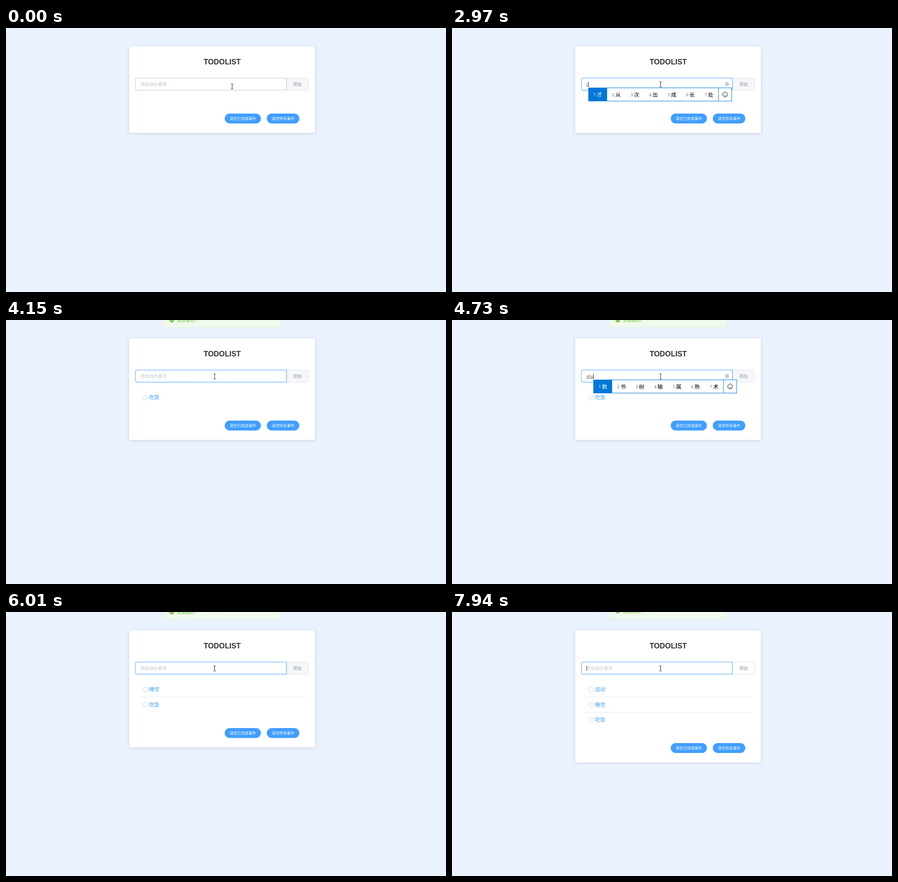
An HTML page that plays this animation: 965 by 580 pixels, repeating every 8 s.

```html
<!DOCTYPE html>
<html lang="zh-CN">
<head>
<meta charset="utf-8">
<title>TODOLIST</title>
<style>
html, body { margin: 0; width: 100%; height: 100%; overflow: hidden; background: #eaf2ff; }
svg { display: block; font: 9.6px 'Liberation Sans', 'Noto Sans CJK SC', sans-serif; }
text { white-space: pre; }
.blue { fill: #409eff; }
.mid { text-anchor: middle; }
.btn { font-size: 8.25px; fill: #fff; }
.item { font-size: 11.2px; }
.ime { font-size: 11.8px; }
.num { font: 9px 'Open Sans', sans-serif; fill: #666; }
.chosen text { fill: #fff; }
.crisp { shape-rendering: crispEdges; }
#card { filter: drop-shadow(0 1px 3px rgba(0, 0, 0, .13)); }
</style>
</head>
<body>
<svg width="965" height="580" viewBox="0 0 965 580">
  <defs>
    <g id="note">
      <rect x="344.5" y="-17.5" width="258" height="33" rx="2.5" fill="#f0f9eb" stroke="#e1f3d8"/>
      <circle cx="363.5" cy="0.7" r="4.8" fill="#67c23a"/>
      <path d="M361.2 .7l1.7 1.8 3-3.4" fill="none" stroke="#fff"/>
      <text x="374.6" y="4.4" fill="#67c23a">添加成功!</text>
    </g>
  </defs>
  <use id="oldNote" href="#note"/>
  <use id="newNote" href="#note"/>
  <rect id="card" x="270" y="40" width="407.5" rx="2.5" fill="#fff" stroke="#ebeef5" stroke-width=".7"/>
  <text x="474.2" y="80.3" class="mid" font-size="16.2" font-weight="bold" fill="#303133">TODOLIST</text>

  <path id="append" d="M615.5 110h45a3 3 0 0 1 3 3v20.500a3 3 0 0 1-3 3h-45z" stroke="#dcdfe6"/>
  <text x="639" y="127" class="mid" fill="#909399">添加</text>
  <path id="field" d="M287 110h328v26.500h-328a3 3 0 0 1-3-3v-20.500a3 3 0 0 1 3-3z" fill="#fff"/>
  <text id="hint" x="294.600" y="127" fill="#c0c4cc">添加待办事项</text>
  <text id="typed" x="294.600" y="127" fill="#606266"></text>
  <rect id="line" class="crisp" x="295" y="128" height="1" fill="#606266"/>
  <rect id="caret" class="crisp" y="118" width="1" height="11" fill="#303133"/>
  <g id="clear">
    <circle cx="603.2" cy="123.2" r="4.400" fill="#c0c4cc"/>
    <path d="M601.700 121.700l3 3m0-3l-3 3" stroke="#fff" stroke-width=".8"/>
  </g>

  <g id="list"></g>
  <g id="buttons">
    <rect x="479.700" y="188" width="79.300" height="21.700" rx="10.850" class="blue"/>
    <rect x="572" y="188" width="71.300" height="21.700" rx="10.850" class="blue"/>
    <text x="519.300" y="202" class="mid btn">清空已完成事件</text>
    <text x="607.700" y="202" class="mid btn">清空所有事件</text>
  </g>
  <g id="popup"></g>
  <path id="pointer" d="M-2.500-5.500h2l.5.500.5-.500h2M0-5V5M-2.500 5.500h2l.5-.500.5.500h2" fill="none" stroke="#222"/>
</svg>
<script>
const LOOP = 8000;
const $ = id => document.getElementById(id);
const show = (id, on) => $(id).style.display = on ? '' : 'none';

// time, typed text, caret visible, popup left edge, popup candidates
const input = [
  [0, '', 0], [790, '', 1], [1220, '', 0], [1770, '', 1], [2320, '', 0],
  [2820, 'c', 1], [2970, 'c', 1, 299, '才 从 次 出 成 长 处'],
  [3090, 'chi', 1, 311, '吃 持 池 尺 迟 齿 翅'],
  [3210, "chi'fan", 1, 325, '吃饭 迟返 吃翻 持范 池饭 尺帆 赤反'],
  [3330, '吃饭', 1], [3610, '', 1], [4150, '', 0],
  [4460, 's', 1], [4600, 's', 1, 299, '是 上 说 时 所 三 四'],
  [4730, 'shu', 1, 310, '数 书 树 输 属 熟 术'],
  [4880, 'shui', 1, 317, '睡 水 谁 税 睡觉 睡衣 水果'],
  [5030, "shui'jiao", 1, 336, '睡觉 睡觉觉 睡觉了 水饺 水角 税交 水窖'],
  [5150, '睡觉', 1], [5550, '', 1], [6010, '', 0], [6560, '', 1],
  [6870, 'y', 1], [6990, 'yu', 1, 299, '与 于 雨 语 鱼 玉 遇'],
  [7120, "yun'd", 1, 315, '运动 匀淡 晕倒 运单 云端 运到 云朵'],
  [7270, "yun'do", 1, 325, '运动 云朵 云洞 晕动 孕栋 匀动'],
  [7400, "yun'dong", 1, 337, '运动 云洞 晕动 云动 孕栋 匀动'],
  [7540, '运动', 1], [7820, '', 1]
];
const pointer = [[0, 496, 128.5], [150, 488, 127], [270, 472, 124], [390, 456, 122],
  [510, 448, 122], [1650, 453, 123], [1770, 457.5, 124]];
const border = [[0, '#c0c4cc'], [790, '#93b6df'], [940, '#409eff']];
const added = [[3610, '吃饭'], [5550, '睡觉'], [7820, '运动']];
// time, offset and opacity of the newest notice
const notice = [[0, 0, 0], [3760, -2.5, .8], [3880, 0, .95], [4030, 0, 1], [5550, 0, 0],
  [5700, -2.5, .9], [5850, 0, .95], [6010, 0, 1], [7820, 0, 0], [7940, -2.5, .9]];

const at = (steps, t) => steps.findLast(s => s[0] <= t);

function popupMarkup(left, words) {
  let x = left;
  const items = words.split(' ').map((word, i) => {
    const width = 28.8 + 11.8 * word.length;
    const back = i ? '' : `<rect x="${left}" y="131" width="${width + .6}" height="29" fill="#0078d7"/>`;
    const item = `<g class="${i ? '' : 'chosen'}">${back}
      <text class="num" x="${x + 11.5}" y="150.3">${i + 1}</text>
      <text class="ime" x="${x + 18.8}" y="151">${word}</text></g>`;
    x += width;
    return item;
  }).join('');
  const end = Math.round(x + 1), face = end + 15;
  return `<rect x="${left + .5}" y="131.5" width="${end + 29 - left}" height="29" fill="#fff" stroke="#0078d7"/>
    ${items}
    <path d="M${end + .5} 131v29" stroke="#0078d7"/>
    <g fill="none" stroke="#222"><circle cx="${face}" cy="146" r="5.5"/>
    <path d="M${face - 3} 147.500q3 3.500 6 0M${face - 2} 143.500v1.500m4-1.500v1.500"/></g>`;
}

function listMarkup(words) {
  return words.map((word, i) => {
    const y = 170.4 + 33.3 * i;
    const rule = i ? `<rect class="crisp" x="291" y="${Math.round(y - 17.4)}" width="365" height="1" fill="#e8ebf2"/>` : '';
    return `${rule}<circle cx="305.2" cy="${y + .3}" r="5.100" fill="#fff" stroke="#a6d1ff" stroke-width=".9"/>
      <text class="item blue" x="313.800" y="${y + 4}">${word}</text>`;
  }).join('');
}

let last, count;
function draw(t) {
  const state = at(input, t);
  const [, text, caret, left, words] = state;
  if (state !== last) {
    last = state;
    $('typed').textContent = text;
    const width = text ? $('typed').getComputedTextLength() : 0;
    $('caret').setAttribute('x', Math.round(294.6 + width));
    $('line').setAttribute('width', width);
    $('popup').innerHTML = words ? popupMarkup(left, words) : '';
    show('hint', !text);
    show('line', /[a-z]/.test(text));
    show('caret', caret);
    show('clear', text && t >= 2970);
  }

  const words2do = added.filter(a => a[0] <= t).map(a => a[1]).reverse();
  if (words2do.length !== count) {
    count = words2do.length;
    const shift = Math.round(33 * count + count / 4);
    $('list').innerHTML = listMarkup(words2do);
    $('card').setAttribute('height', 190.5 + shift);
    $('buttons').setAttribute('transform', `translate(0 ${shift})`);
  }

  const [, x, y] = at(pointer, t);
  $('pointer').setAttribute('transform', `translate(${x} ${y})`);
  $('field').setAttribute('stroke', at(border, t)[1]);
  $('append').setAttribute('fill', t < 7820 ? '#f5f7fa' : '#fefefe');
  const [, offset, opacity] = at(notice, t);
  show('oldNote', t >= 5550);
  $('newNote').setAttribute('transform', `translate(0 ${offset})`);
  $('newNote').setAttribute('opacity', opacity);
}

const start = performance.now();
function tick() {
  draw((performance.now() - start) % LOOP);
  requestAnimationFrame(tick);
}
tick();
</script>
</body>
</html>
```
